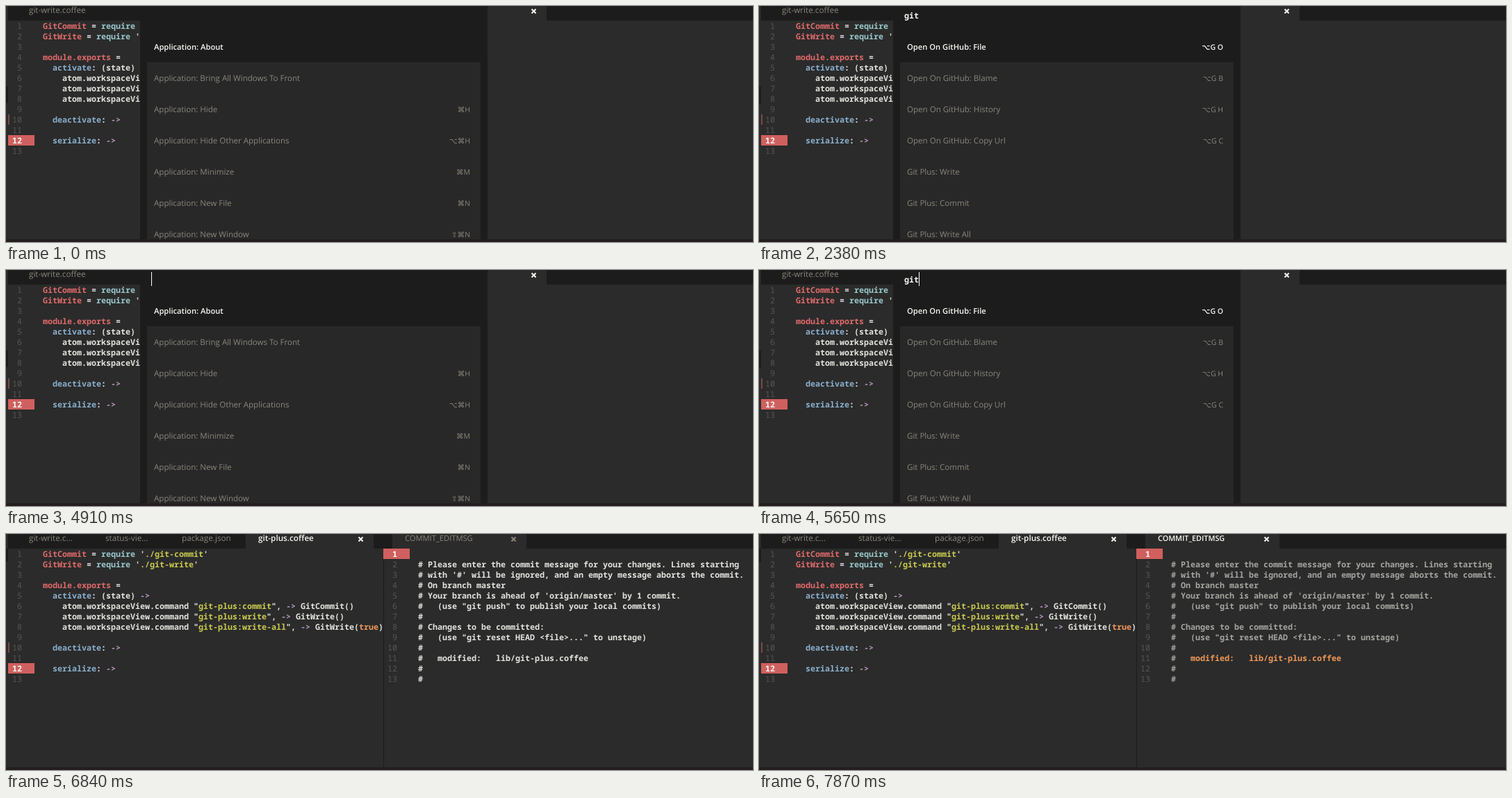
These frames come from a looping animation (1075 by 340 pixels, 8000 ms). An HTML page with a canvas:

```html
<!DOCTYPE html>
<html lang="en">
<head>
<meta charset="utf-8">
<title>Editor command palette</title>
<style>
  html, body { margin: 0; width: 100%; height: 100%; overflow: hidden; background: #2b2b2b; }
  canvas { display: block; }
</style>
</head>
<body>
<canvas id="stage" width="1075" height="340"></canvas>
<script>
const ctx = document.getElementById('stage').getContext('2d');
const LOOP = 8000, CHAR = 7, LINE = 15, ROW = 45;
const MONO = '11.667px "Noto Sans Mono", "DejaVu Sans Mono", monospace';
const SANS = '"Open Sans", "DejaVu Sans", sans-serif';
const C = {
  bg: '#2b2b2b', dark: '#1c1c1c', row: '#282828', dim: '#8a867c', number: '#565656',
  white: '#f8f8f2', text: '#e4e3de', red: '#e06a6a', gutter: '#d0605f', cyan: '#98c8cb',
  blue: '#8ab0ce', purple: '#b89ac2', string: '#caca50', orange: '#f09858',
  comment: '#a5a5a0', cursor: '#969696'
};

const source = `GitCommit = require './git-commit'
GitWrite = require './git-write'

module.exports =
  activate: (state) ->
    atom.workspaceView.command "git-plus:commit", -> GitCommit()
    atom.workspaceView.command "git-plus:write", -> GitWrite()
    atom.workspaceView.command "git-plus:write-all", -> GitWrite(true)

  deactivate: ->

  serialize: ->
`.split('\n');

const message = `
# Please enter the commit message for your changes. Lines starting
# with '#' will be ignored, and an empty message aborts the commit.
# On branch master
# Your branch is ahead of 'origin/master' by 1 commit.
#   (use "git push" to publish your local commits)
#
# Changes to be committed:
#   (use "git reset HEAD <file>..." to unstage)
#
#   modified:   lib/git-plus.coffee
#
#`.split('\n');

// Each palette entry is "label|shortcut".
const appList = ['About', 'Bring All Windows To Front', 'Hide|⌘H', 'Hide Other Applications|⌥⌘H',
  'Minimize|⌘M', 'New File|⌘N', 'New Window|⇧⌘N'].map(s => 'Application: ' + s);
const copyUrl = 'Open On GitHub: Copy Url|⌥G C';
const gitList = ['Open On GitHub: File|⌥G O', 'Open On GitHub: Blame|⌥G B', 'Open On GitHub: History|⌥G H',
  copyUrl, 'Git Plus: Write', 'Git Plus: Commit', 'Git Plus: Write All'];
const writeList = ['Git Plus: Write', 'Git Plus: Write All', 'Wrap Guide: Toggle'];
const commitList = ['Git Plus: Commit'];
const mixedList = ['Git Plus: Commit', copyUrl, 'Open On GitHub: History|⌥G H'];

const palette = (query, list, cursor = true) => ({ query, list, cursor });
const editor = cursor => ({ cursor });
const split = (cursor, active, colored) => ({ split: true, cursor, active, colored });

const timeline = [
  [0, palette('', appList, false)],
  [300, palette('', appList)],
  [740, palette('', appList, false)],
  [890, palette('g', appList)],
  [1040, palette('g', gitList)],
  [1190, palette('gi', gitList)],
  [1480, palette('git', gitList)],
  [2080, palette('git ', gitList)],
  [2380, palette('git ', gitList, false)],
  [2530, palette('git w', gitList)],
  [2680, palette('git wr', writeList)],
  [2830, palette('git wri', writeList)],
  [3120, editor(false)],
  [3270, editor(true)],
  [4910, palette('', appList)],
  [5210, palette('g', appList)],
  [5360, palette('gi', gitList)],
  [5510, palette('git', gitList)],
  [5660, palette('git ', gitList)],
  [5800, palette('git c', mixedList)],
  [5950, palette('git com', mixedList)],
  [6100, palette('git comm', commitList, false)],
  [6550, editor(true)],
  [6840, split(false, false, false)],
  [6990, split(true, false, false)],
  [7140, split(true, true, false)],
  [7280, split(true, true, true)],
  [7580, split(false, true, true)]
];

function rect(x, y, w, h, color) {
  ctx.fillStyle = color;
  ctx.fillRect(x, y, w, h);
}

function text(str, x, y, font, color, align = 'left') {
  ctx.font = font;
  ctx.fillStyle = color;
  ctx.textAlign = align;
  ctx.fillText(str, x, y);
}

// Monospaced text on an exact character grid.
function mono(str, x, y, color, weight = 600) {
  [...str].forEach((ch, i) => {
    if (ch !== ' ') text(ch, x + i * CHAR, y, `${weight} ${MONO}`, color);
  });
}

const baseline = line => 33 + line * LINE;

const tokens = new RegExp([
  /(?<purple>->)/, /(?<cyan>\brequire\b)/, /(?<string>(?<=["'])[.\w\/:-]+(?=["']))/,
  /(?<blue>\w+(?=: ))/, /(?<orange>\btrue\b)/, /(?<red>^[\w.]+(?= =))/, /(?<text>\w+|.)/
].map(r => r.source).join('|'), 'g');

function drawCode() {
  source.forEach((line, i) => {
    for (const m of line.matchAll(tokens)) {
      const kind = Object.keys(m.groups).find(k => m.groups[k] !== undefined);
      mono(m[0], 53 + m.index * CHAR, baseline(i), C[kind]);
    }
  });
}

function drawMessage(colored) {
  message.forEach((line, i) => {
    const hot = colored && line.includes('modified');
    mono(line.slice(0, 1), 593, baseline(i), colored ? C.comment : C.text);
    mono(line.slice(1), 600, baseline(i), hot ? C.orange : colored ? C.comment : C.text);
  });
}

function drawGutter(x, current) {
  rect(x + 3, 21 + current * LINE, 38, 15, C.gutter);
  for (let i = 0; i < 13; i++) {
    const label = String(i + 1), on = i === current;
    mono(label, x + 23 - label.length * CHAR, baseline(i), on ? C.white : C.number, on ? 700 : 400);
  }
}

function drawCursor(x, line) {
  rect(x, 21 + line * LINE, CHAR, 15, C.cursor);
}

function drawClose(x, color) {
  ctx.strokeStyle = color;
  ctx.lineWidth = 2;
  ctx.beginPath();
  ctx.moveTo(x - 3, 4.5); ctx.lineTo(x + 3, 10.5);
  ctx.moveTo(x + 3, 4.5); ctx.lineTo(x - 3, 10.5);
  ctx.stroke();
}

function drawTab(label, x, active, size = 11.7) {
  text(label, x, 10, `${active ? 600 : 400} ${size}px ${SANS}`, active ? C.white : C.dim);
}

function drawTabs(isSplit, rightActive) {
  rect(3, 0, 1072, 21, C.dark);
  const labels = isSplit
    ? ['git-write.c...', 'status-vie...', 'package.json', 'git-plus.coffee']
    : ['git-write.coffee', 'status-view.coffee', 'package.json', 'git-plus.coffee'];
  const step = isSplit ? 110 : 190;
  const activeX = 15 + step * 3;
  rect(activeX, 0, isSplit ? 184 : 193, 21, C.bg);
  labels.forEach((label, i) => drawTab(label, 33 + i * step, i === 3));
  drawClose(isSplit ? 510.5 : 759.5, C.white);
  if (isSplit) {
    rect(556, 0, 193, 21, C.bg);
    drawTab('COMMIT_EDITMSG', 574, rightActive, rightActive ? 10.8 : 11.15);
    drawClose(730.5, rightActive ? C.white : C.dim);
  }
}

function drawPalette({ query, list, cursor }) {
  rect(193, 0, 500, 46 + list.length * ROW, C.dark);
  mono(query, 209, 18, C.white, 600);
  if (cursor) rect(209 + query.length * CHAR, 3, 1, 20, '#fff');
  list.forEach((entry, i) => {
    const [label, keys = ''] = entry.split('|');
    const y = 63 + i * ROW, color = i ? C.dim : C.white;
    if (i) rect(203, 36 + i * ROW, 480, ROW, C.row);
    text(label, 213, y, `${i ? '400 11.55px' : '600 11.2px'} ${SANS}`, color);
    text(keys, 668, y, `${i ? 400 : 600} 10.5px ${SANS}`, color, 'right');
  });
}

function draw(state) {
  rect(0, 0, 1075, 340, C.bg);
  rect(0, state.split ? 21 : 116, 3, state.split ? 19 : 24, C.dark);
  drawTabs(state.split, state.active);
  drawGutter(0, 11);
  rect(3, 156, 2, 15, '#7c4749');
  if (state.cursor && !state.split && !state.list) drawCursor(53, 11);
  drawCode();
  if (state.split) {
    rect(543, 0, 1, 340, C.dark);
    drawGutter(540, 0);
    if (state.cursor) drawCursor(593, 0);
    drawMessage(state.colored);
  }
  if (state.list) drawPalette(state);
  rect(0, 336, 1075, 4, '#241e20');
}

const start = performance.now();
function frame() {
  const t = (performance.now() - start) % LOOP;
  draw(timeline.findLast(([time]) => time <= t)[1]);
  requestAnimationFrame(frame);
}
ctx.textRendering = 'geometricPrecision';
frame();
</script>
</body>
</html>
```
